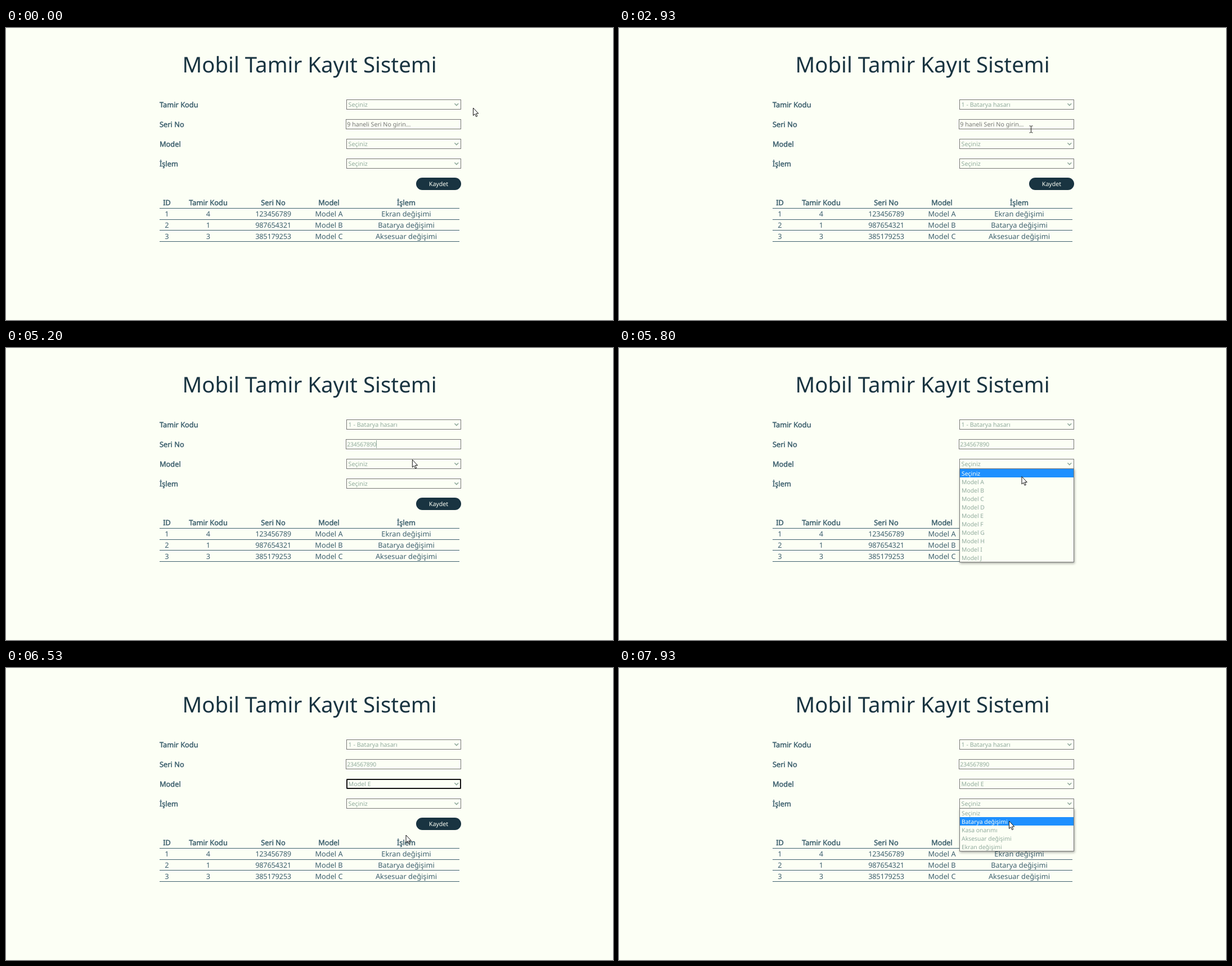
Animation of 1079 by 519 pixels, one loop 8 s. Source, as an HTML page:

```html
<!DOCTYPE html>
<html lang="tr">
<head>
<meta charset="utf-8">
<title>Mobil Tamir Kayıt Sistemi</title>
<style>
  html, body { margin: 0; width: 100%; height: 100%; overflow: hidden; background: #fcfff5; }
  svg { display: block; width: 100%; height: 100%; }
  text { font-family: "Noto Sans", "Open Sans", sans-serif; font-size: 12.8px; fill: #3e606f; text-rendering: geometricPrecision; white-space: pre; }
  .title { font-size: 38.4px; fill: #193441; }
  .strong { stroke: #3e606f; stroke-width: .5px; }
  .mid { text-anchor: middle; }
  .digits { letter-spacing: -.25px; }
  .value { font-size: 10.67px; fill: #91aa9d; }
  .serial { font-size: 10.4px; letter-spacing: -.2px; }
  .hint { fill: #757575; }
  .option { font-size: 10.4px; fill: #91aa9d; }
  .option.on, .button { fill: #fcfff5; }
  .button { font-size: 10.67px; }
  .box { fill: #fcfff5; stroke: #767676; }
  .popup { filter: drop-shadow(1px 2px 2px rgba(0, 0, 0, .35)); }
  .chevron { fill: none; stroke: #91aa9d; stroke-width: 1.6; }
  .ring { fill: none; stroke: #101010; stroke-width: 2; }
  .arrow { fill: #fff; stroke: #111; stroke-linejoin: round; }
  .beam { fill: none; stroke: #222; }
</style>
</head>
<body>
<svg id="stage" viewBox="0 0 1079 519"></svg>
<script>
const NS = "http://www.w3.org/2000/svg";
const stage = document.getElementById("stage");
const FPS = 15, TICKS = 120;

function add(parent, tag, attrs = {}, content = "") {
  const el = document.createElementNS(NS, tag);
  for (const key in attrs) el.setAttribute(key, attrs[key]);
  el.textContent = content;
  parent.appendChild(el);
  return el;
}
const write = (x, y, cls, content, parent = stage) => add(parent, "text", { x, y, class: cls }, content);
const show = (el, on) => el.setAttribute("visibility", on ? "visible" : "hidden");

// Page
write(539.5, 79, "title mid", "Mobil Tamir Kayıt Sistemi");

const tops = [127, 162, 197, 232];
const values = ["Tamir Kodu", "Seri No", "Model", "İşlem"].map((label, i) => {
  const y = tops[i], isInput = i === 1;
  write(273, y + 13.5, "strong", label);
  add(stage, "rect", { class: "box", x: isInput ? 604.5 : 605.5, y: y + .5, width: isInput ? 204 : 203, height: 17 });
  if (!isInput) add(stage, "path", { class: "chevron", d: `M797.4 ${y + 7.2}l3.4 3.4l3.4 -3.4` });
  return write(isInput ? 606.3 : 608.6, y + 13, "value", "Seçiniz");
});
const serial = values[1];

add(stage, "rect", { x: 729, y: 266, width: 80, height: 22, rx: 11, fill: "#193441" });
write(769, 281.3, "button mid", "Kaydet");

const columns = [286, 359.5, 475, 574, 711.5];
const rows = [
  ["ID", "Tamir Kodu", "Seri No", "Model", "İşlem"],
  ["1", "4", "123456789", "Model A", "Ekran değişimi"],
  ["2", "1", "987654321", "Model B", "Batarya değişimi"],
  ["3", "3", "385179253", "Model C", "Aksesuar değişimi"]
];
rows.forEach((row, r) => {
  row.forEach((cell, c) => {
    const style = r === 0 ? " strong" : c === 2 ? " digits" : "";
    write(columns[c], 315.4 + r * 19.7, "mid" + style, cell);
  });
  add(stage, "rect", { x: 273, y: Math.round(320 + r * 19.7), width: 533, height: 1, fill: "#3e606f" });
});

const ring = add(stage, "rect", { class: "ring", x: 606, width: 202, height: 16, rx: 1.5 });
const caret = add(stage, "rect", { y: 164, width: 1, height: 14, fill: "#91aa9d" });

// Popups: open and close are ticks
function makePopup(field, open, close, options) {
  const top = tops[field] + 18, g = add(stage, "g");
  add(g, "rect", { class: "box popup", x: 605.5, y: top - .5, width: 203, height: options.length * 15 + 1 });
  const bar = add(g, "rect", { x: 606, width: 202, height: 15, fill: "#1e90ff" });
  const items = options.map((option, i) => write(609, top + i * 15 + 11.5, "option", option, g));
  return { g, top, open, close, bar, items };
}
const popups = [
  makePopup(0, 13, 30, ["Seçiniz", "1 - Batarya hasarı", "2 - Kasa hasarı", "3 - Aksesuar hasarı", "4 - Ekran hasarı"]),
  makePopup(2, 81, 98, ["Seçiniz", ..."ABCDEFGHIJ"].map((c, i) => i ? "Model " + c : c)),
  makePopup(3, 110, TICKS, ["Seçiniz", "Batarya değişimi", "Kasa onarımı", "Aksesuar değişimi", "Ekran değişimi"])
];

// Pointer
const arrow = add(stage, "path", { class: "arrow", d: "M0 0V13.5L3 10.8L5.2 15.6L7.3 14.7L5.1 10H9.3Z" });
const beam = add(stage, "path", { class: "beam", d: "M-3 -6H-1L0 -5L1 -6H3M0 -5V5M-3 6H-1L0 5L1 6H3" });

// [tick, x, y]
const path = [
  [0, 830.5, 142], [5, 830.5, 142], [8, 794, 135], [11, 766, 134],
  [15, 766, 134], [19, 751, 161.5], [22, 742.5, 170],
  [31, 742.5, 170], [36, 732.5, 180], [52, 732.5, 180], [54, 730.5, 178],
  [72, 730.5, 178], [79, 721, 202], [84, 721, 202], [87, 716, 228.5],
  [91, 713, 266], [95, 711, 297], [100, 711, 297], [106, 694, 240],
  [113, 694, 240], [119, 693.5, 272]
];
function pointer(tick) {
  let i = 1;
  while (path[i][0] < tick) i++;
  const [t0, x0, y0] = path[i - 1], [t1, x1, y1] = path[i];
  const k = (tick - t0) / (t1 - t0);
  return [x0 + (x1 - x0) * k, y0 + (y1 - y0) * k];
}

const keys = [46, 49, 52, 55, 59, 62, 66, 69, 72];

function render(tick) {
  const [x, y] = pointer(tick);
  const overInput = tick >= 30 && tick < 80 && y < 181;
  show(arrow, !overInput);
  show(beam, overInput);
  (overInput ? beam : arrow).setAttribute("transform", `translate(${x} ${y})`);

  values[0].textContent = tick < 30 ? "Seçiniz" : "1 - Batarya hasarı";
  values[2].textContent = tick < 98 ? "Seçiniz" : "Model E";

  const typed = keys.filter(k => k <= tick).length;
  serial.textContent = typed ? "234567890".slice(0, typed) : "9 haneli Seri No girin...";
  serial.setAttribute("class", typed ? "value serial" : "value hint");
  caret.setAttribute("x", Math.floor(607 + typed * 5.72));
  show(caret, (tick >= 36 && tick < 44) || (tick >= 46 && tick < 80));

  const first = tick >= 30 && tick < 36;
  ring.setAttribute("y", tops[first ? 0 : 2] + 1);
  show(ring, first || (tick >= 98 && tick < 110));

  for (const p of popups) {
    show(p.g, tick >= p.open && tick < p.close);
    const row = Math.min(p.items.length - 1, Math.max(0, Math.floor((y - p.top) / 15)));
    p.bar.setAttribute("y", p.top + row * 15);
    p.items.forEach((item, i) => item.setAttribute("class", i === row ? "option on" : "option"));
  }
}

const start = performance.now();
function loop() {
  const ms = Math.max(0, performance.now() - start);
  render(Math.floor((ms + 5) * FPS / 1000) % TICKS);
  requestAnimationFrame(loop);
}
loop();
</script>
</body>
</html>
```
